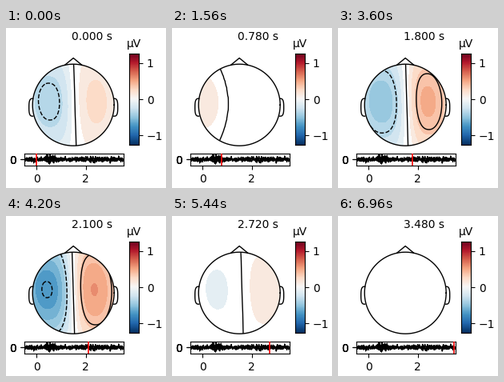
These frames come from a looping animation (200x200 px, 7 s). A matplotlib script:

```python
import numpy as np
import matplotlib.pyplot as plt
from matplotlib.animation import FuncAnimation
from matplotlib.patches import Circle

FRAMES, STEP = 175, 0.02
VMAX, BAND = 1.265, 0.12
CX, CY, R = 84.2, 96.2, 51.0
CMAP = plt.get_cmap("RdBu_r")
LEVELS = np.arange(-3, 4) * 0.4

plt.rcParams.update({"font.family": "DejaVu Sans", "font.size": 10})
fig = plt.figure(figsize=(2, 2), dpi=100, facecolor="white")
rng = np.random.default_rng(4)
times = np.arange(FRAMES) * STEP


def add_axes(x, y, w, h):
    """Axes placed in pixels from the top left corner."""
    return fig.add_axes([x / 200, 1 - (y + h) / 200, w / 200, h / 200])


# Key points: strength of both lobes and x of the line between them
keys = [0, 0.78, 1.32, 1.8, 2.4, 3.02, 3.48]
left = np.interp(times, keys, [-0.45, 0.15, -0.16, -0.56, -0.83, -0.42, 0.02])
right = np.interp(times, keys, [0.28, -0.01, 0.29, 0.52, 0.52, 0.57, 0.02])
zero = np.interp(times, keys, [86, 69, 94, 86, 82, 93, 85])

# Fast fluctuation between the key points
smooth = [0.25, 0.5, 0.25]
noise = [np.convolve(rng.normal(size=FRAMES), smooth, "same") for _ in range(2)]
phase = np.interp(times, keys, np.arange(len(keys)))
gate = 0.35 * np.abs(np.sin(np.pi * phase)) ** 0.6
left -= gate * noise[0]
right += gate * (0.6 * noise[0] + 0.5 * noise[1])

gx, gy = np.meshgrid(np.arange(32, 138) + 0.5, np.arange(44, 150) + 0.5)
dy = gy - 92
fade = np.exp(-0.5 * (dy / 48) ** 2)


def lobe(u, peak, width):
    """Rises from 0 at u=0 to 1 at the peak, then falls off slowly."""
    s = np.clip(u / peak, 0, 1)
    fall = np.exp(-0.5 * (np.maximum(u - peak, 0) / width) ** 2)
    return (1 - (1 - s) ** 2.5) * fall


def field(i):
    z = zero[i]
    bend = max(0, 80 - z)
    u = gx - (z + 0.03 * dy - bend * (dy / 45) ** 2)
    left_x = max(46, 52 + 1.5 * (z - 85))
    v = left[i] * lobe(-u, z - left_x, 27) + right[i] * lobe(u, 27, 23)
    return v * fade + 1e-3


def shade(v):
    """Colour the field in flat bands, white around zero."""
    band = np.trunc(v / BAND)
    rgba = CMAP(band * BAND / VMAX / 2 + 0.5)
    rgba[band == 0] = 1
    return rgba


# Head
head = add_axes(0, 0, 200, 200)
head.axis("off")
image = head.imshow(shade(field(0)), extent=(32, 138, 150, 44),
                    interpolation="nearest", aspect="auto", zorder=1)
head.set(xlim=(0, 200), ylim=(200, 0))
disc = Circle((CX, CY), R, transform=head.transData)
image.set_clip_path(disc)


def stroke(x, y):
    head.plot(CX + x, CY - y, color="black", lw=1, zorder=4)


angle = np.linspace(0, 2 * np.pi, 121)
stroke(R * np.cos(angle), R * np.sin(angle))
stroke(R * np.array([-0.209, 0, 0.209]), R * np.array([0.978, 1.15, 0.978]))
a = np.linspace(-np.pi / 2, np.pi / 2, 40)
ear_x = 50.5 + 5 * np.cos(a) ** 0.6
ear_y = -3 + 11 * np.sign(a) * np.abs(np.sin(a)) ** 0.7
for side in (-1, 1):
    stroke(side * ear_x, ear_y)
clock = head.text(107.2, 15, "", ha="center", va="baseline")

# Colour bar
bar = add_axes(154, 32, 12, 114.4)
bar.imshow(np.linspace(1, 0, 256)[:, None], cmap=CMAP, aspect="auto",
           extent=(0, 1, -VMAX, VMAX))
bar.set_xticks([])
bar.yaxis.tick_right()
bar.set_yticks([-1, 0, 1])
bar.set_title("µV", fontsize=10, pad=6)

# Signal strip
strip = add_axes(23, 156.5, 123.5, 15.5)
t = np.arange(-0.5, 3.53, 0.01)
level = (1.5 + 1.6 * np.exp(-((t - 0.55) / 0.22) ** 2)
         + 0.5 * np.exp(-((t - 2.3) / 0.4) ** 2))
for _ in range(4):
    wave = np.convolve(rng.normal(size=t.size), np.ones(3) / 3, "same")
    strip.plot(t, wave * level, color="black", lw=0.8)
strip.set(xlim=(-0.5, 3.53), ylim=(-5, 5), xticks=[0, 2], yticks=[-0.01, 0, 0.01])
strip.set_yticklabels(["0"] * 3)
cursor = strip.axvline(0, color="red", lw=1.2, zorder=5)

lines = []


def update(i):
    while lines:
        lines.pop().remove()
    v = field(i)
    image.set_data(shade(v))
    shown = [c for c in LEVELS if v.min() < c < v.max()]
    if shown:
        cs = head.contour(gx[::2, ::2], gy[::2, ::2], v[::2, ::2], levels=shown,
                          colors="black", linewidths=1, zorder=3)
        cs.set_clip_path(disc)
        lines.append(cs)
    clock.set_text(f"{times[i]:.3f} s")
    cursor.set_xdata([times[i]] * 2)
    return []


anim = FuncAnimation(fig, update, frames=FRAMES, interval=40, repeat=True,
                     repeat_delay=0, init_func=lambda: update(0))
plt.show()
```
